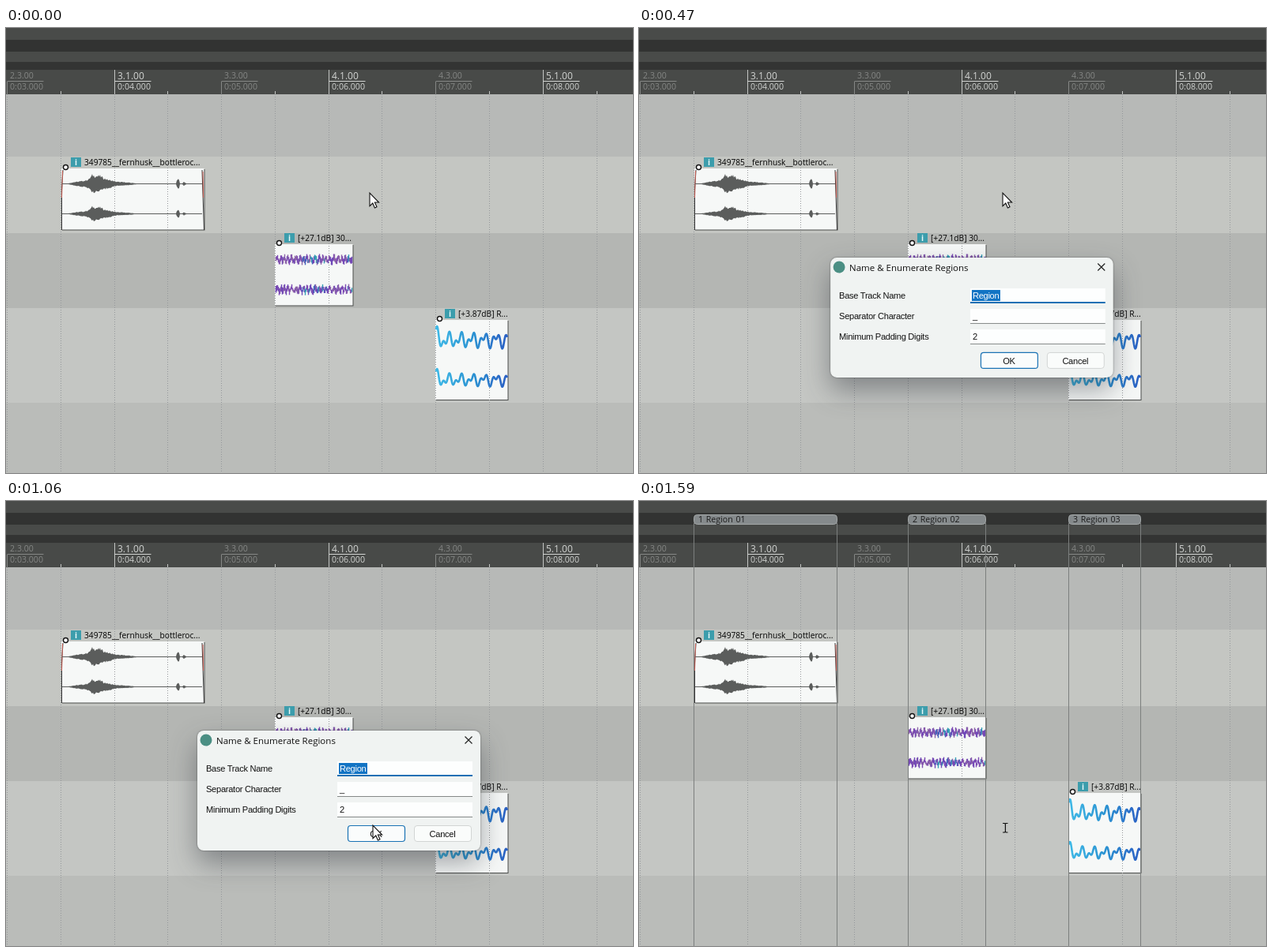
Recreate the animation shown at these times as an HTML page. Size 793x564 px, loop 2240 ms.

```html
<!DOCTYPE html>
<html lang="en">
<head>
<meta charset="utf-8">
<title>Name and enumerate regions</title>
<style>
  html, body { margin: 0; width: 100%; height: 100%; overflow: hidden; background: #b9bbb8; }
  svg { display: block; width: 793px; height: 564px; font-family: "Open Sans", sans-serif; }
  .clip-name { font-size: 10.2px; fill: #000; }
  .region-name { font-size: 10.6px; word-spacing: 1px; fill: #1c1c1c; }
  .form { font: 11.1px "Liberation Sans", Arial, sans-serif; letter-spacing: -.28px; fill: #111; }
  .mid { text-anchor: middle; }
</style>
</head>
<body>
<svg viewBox="0 0 793 564">
  <g id="stage"></g>
  <g id="regions"></g>
  <g id="dialog">
    <rect x="242" y="291" width="358" height="152" rx="8" fill="#f0f3f2"
      style="filter:drop-shadow(0 0 1px rgba(0,0,0,.4)) drop-shadow(0 16px 17px rgba(30,36,44,.4))"/>
    <circle cx="253" cy="303" r="7.5" fill="#4b8f84"/>
    <text x="266" y="308" font-size="11.5" fill="#111">Name &amp; Enumerate Regions</text>
    <path d="M580.5 298.5l9 9m0-9l-9 9" stroke="#222" stroke-width="1.2"/>
    <g id="fields"></g>
    <rect id="selection" x="421" y="332" width="36" height="14" fill="#1274c4"/>
    <text id="value" class="form" x="422" y="343">Region</text>
    <text class="form" x="422" y="369">_</text>
    <text class="form" x="422" y="395">2</text>
    <rect id="ok" x="432.5" y="411.5" width="72" height="20" rx="3.5" stroke="#1a72b4" stroke-width="1.2"/>
    <rect id="focus" x="434.5" y="413.5" width="68" height="16" fill="none" stroke="#222" stroke-dasharray="1 1"/>
    <text class="form mid" x="468" y="426">OK</text>
    <rect x="516.5" y="411.5" width="72" height="20" rx="3.5" fill="#fafcfb" stroke="#d2d5d4"/>
    <text class="form mid" x="552" y="426">Cancel</text>
  </g>
  <path id="arrow" d="M0 0V16.6L3.8 13L6.4 19L9 17.8L6.4 12H11.6Z" fill="#fff" stroke="#111" stroke-width="1.1"/>
  <path id="beam" d="M460 408.5h2.5l.8 .8l.8-.8h2.4M463.4 409v10.5M460 420h2.5l.8-.8l.8 .8h2.4" fill="none" stroke="#111" stroke-width="1.2"/>
</svg>
<script>
const $ = id => document.getElementById(id);
const clamp = v => Math.min(1, Math.max(0, v));
const smooth = v => v * v * (3 - 2 * v);
const rand = n => { const v = Math.sin(n * 12.9898) * 43758.5453; return v - Math.floor(v); };
const rect = (x, y, w, h, fill) => `<rect x="${x}" y="${y}" width="${w}" height="${h}" fill="${fill}"/>`;
const line = (d, stroke, more = '') => `<path d="${d}" fill="none" stroke="${stroke}" ${more}/>`;
const text = (x, y, s, more) => `<text x="${x}" y="${y}" ${more}>${s}</text>`;
const gridX = k => Math.floor(1.4 + 67.8 * k) + .5;

const clips = [
  { x: 70, y: 179, w: 180.5, h: 76.5, name: '349785__fernhusk__bottleroc...' },
  { x: 340, y: 275, w: 98.5, h: 76.5, name: '[+27.1dB] 30...' },
  { x: 543, y: 371, w: 91.5, h: 100, name: '[+3.87dB] R...' }
];

function bands() {
  const tops = [0, 15, 30, 43, 53, 84, 163, 260, 355, 475, 564];
  const fills = ['#494b49', '#323332', '#494b49', '#333433', '#484a48',
    '#b7b9b7', '#c4c6c2', '#b4b6b3', '#c4c6c3', '#babcb9'];
  return fills.map((f, i) => rect(0, tops[i], 793, tops[i + 1] - tops[i], f)).join('');
}

function ruler() {
  let out = '';
  for (let k = 0; k < 12; k++) {
    const x = gridX(k), major = k % 4 === 2, dim = k % 4 === 0;
    const color = major ? '#d2d4d2' : '#858785';
    out += line(`M${x} ${major ? 53 : dim ? 68 : 80}V84`, dim ? color : '#c4c6c4');
    if (k % 2) continue;
    const beat = `${2 + Math.floor((k + 2) / 4)}.${major ? 1 : 3}.00`;
    out += line(`M${x} 67.5h46`, color) +
      text(x + 3.5, major ? 65 : 63.5, beat, `font-size="${major ? 12 : 10.6}" fill="${color}"`) +
      text(x + 3.5, 78, `0:0${3 + k / 2}.000`, `font-size="10.6" fill="${color}"`);
  }
  return out;
}

function grid() {
  let d = '';
  for (let k = 0; k < 12; k++) d += `M${gridX(k)} 84V564`;
  return line(d, '#94979a', 'stroke-dasharray="1 2"');
}

const clipBody = ({ x, y, w, h }) =>
  rect(x + 1, y, w, h + 1, '#4a4c4b') + rect(x, y - 1, w, h + 1, '#f6f8f7');

const clipHeader = ({ x, y, name }) =>
  `<circle cx="${x + 5.5}" cy="${y - 2.5}" r="3" fill="#fff" stroke="#111" stroke-width="1.4"/>` +
  rect(x + 12, y - 15, 13, 12, '#3c9dac') +
  text(x + 18.5, y - 5, 'i', 'class="mid" font-size="10" font-weight="700" fill="#e8f8fa"') +
  text(x + 29, y - 5, name, 'class="clip-name"');

// Piecewise envelope mirrored around a centre line
function burst(cy, scale) {
  const env = [[71, .4], [79, .5], [84, 1.8], [100, 4], [105, 6], [109, 11], [114, 10], [119, 10], [124, 7],
    [130, 5], [140, 2.6], [155, 1.6], [167, .4], [215, .4], [217, 6.5], [219, 5], [220, .5], [223, .5],
    [225, 2.8], [228, .4], [249, .4]];
  const top = [], bottom = [];
  let i = 0;
  for (let x = 71; x < 249; x++) {
    while (env[i + 1][0] < x) i++;
    const [x0, a0] = env[i], [x1, a1] = env[i + 1];
    const a = (a0 + (a1 - a0) * (x - x0) / (x1 - x0)) * scale;
    const rough = n => a > .6 ? a * (.75 + .4 * rand(x + n)) : .5;
    top.push(`${x} ${cy - rough(0)}`);
    bottom.unshift(`${x} ${cy + rough(500)}`);
  }
  return `<path d="M${top.concat(bottom).join('L')}Z" fill="#5b5d5c"/>`;
}

function noise(cy) {
  const colors = ['#7d4bb3', '#8d63a8', '#6e48b8', '#35a0b4', '#3f62bd'];
  let out = '';
  for (let x = 341; x < 438; x++) {
    const cool = (x > 374 && x < 406) || x > 430;
    const color = colors[Math.floor(rand(x + cy) * (cool ? 5 : 3))];
    const wave = 2.4 * Math.sin(x * 1.3 + Math.sin(x / 4));
    const reach = n => 1.6 + 3.4 * rand(x * 3 + n);
    out += line(`M${x + .5} ${cy + wave - reach(cy)}V${cy + wave + reach(cy + 9)}`, color, 'stroke-width="1.4"');
  }
  return out;
}

// Two beating sines with a strong attack
function tone(cy, scale) {
  const points = [];
  for (let x = 544; x <= 634; x += .5) {
    const u = x - 544;
    const y = 6 * Math.cos(.42 * u - .6) + 5 * Math.cos(.8 * u - 1) + 9 * Math.exp(-u / 4) * Math.cos(.6 * u - .9);
    points.push(`${x} ${cy - scale * y}`);
  }
  return line('M' + points.join('L'), 'url(#blue)', 'stroke-width="2.6" stroke-linejoin="round"');
}

const fades = line('M70.5 256V205L72 180M248 180L250.5 256', '#333') +
  line('M70.5 215L71.5 181M249 182L249.6 215', '#c65a50');

$('stage').innerHTML =
  `<linearGradient id="blue" gradientUnits="userSpaceOnUse" x1="544" x2="635">
    <stop stop-color="#3fb9e6"/><stop offset=".5" stop-color="#2b93d2"/><stop offset="1" stop-color="#2b5fc4"/>
  </linearGradient>` +
  bands() + ruler() + clips.map(clipBody).join('') + grid() + fades +
  burst(197.5, 1) + burst(235.5, .8) + noise(293.5) + noise(331.5) + tone(395.5, 1) + tone(446, .8) +
  clips.map(clipHeader).join('');

$('regions').innerHTML = clips.map(({ x, w }, i) => {
  const left = x + (i ? .5 : -.5), right = x + w;
  return line(`M${left} 28V564M${right} 28V564`, '#7c7f7e') +
    `<rect x="${left}" y="17.5" width="${right - left}" height="12" rx="4" fill="#858a8c" stroke="#a4a8a8"/>` +
    text(left + 5.5, 27, `${i + 1} Region 0${i + 1}`, 'class="region-name"');
}).join('');

$('fields').innerHTML = ['Base Track Name', 'Separator Character', 'Minimum Padding Digits'].map((label, i) => {
  const y = 330 + 26 * i;
  return text(253, y + 13, label, 'class="form"') + rect(419, y, 171, 19, '#fdfefe') +
    (i ? rect(419, y + 18, 171, 1, '#858988') : rect(419, y + 17, 171, 2, '#1b6fb4'));
}).join('');

const show = (id, on) => $(id).setAttribute('visibility', on ? 'visible' : 'hidden');

function pointer(t) {
  const path = [[0, 460, 209], [500, 460, 209], [660, 457, 208], [830, 457, 208],
    [1050, 464, 411], [1130, 464, 411], [1240, 464, 418], [2240, 464, 418]];
  const i = path.findIndex(p => p[0] > t);
  const [t0, x0, y0] = path[i - 1], [t1, x1, y1] = path[i];
  const k = smooth((t - t0) / (t1 - t0));
  return [x0 + (x1 - x0) * k, y0 + (y1 - y0) * k];
}

function draw(t) {
  const opening = clamp((t - 290) / 204), closing = clamp((t - 1430) / 150);
  const alpha = t < 300 ? 0 : clamp((t - 285) / 100) * (1 - closing);
  const scale = 1 - .08 * (1 - opening) ** 2 - .1 * closing ** 2;
  const shift = (1 - scale) * -60;
  $('dialog').setAttribute('opacity', alpha);
  $('dialog').setAttribute('transform',
    `translate(${421 + shift} ${367 + shift / 2}) scale(${scale}) translate(-421 -367)`);

  const pressed = t >= 1260, done = t >= 1460;
  show('selection', !pressed);
  show('focus', pressed);
  $('value').style.fill = pressed ? '#111' : '#fff';
  $('ok').setAttribute('fill', pressed ? '#c4d6e6' : '#fafcfc');
  show('regions', done);
  show('arrow', !done);
  show('beam', done);
  $('arrow').setAttribute('transform', `translate(${pointer(t)})`);
}

const start = performance.now();
function tick() {
  draw((performance.now() - start) % 2240);
  requestAnimationFrame(tick);
}
tick();
</script>
</body>
</html>
```
